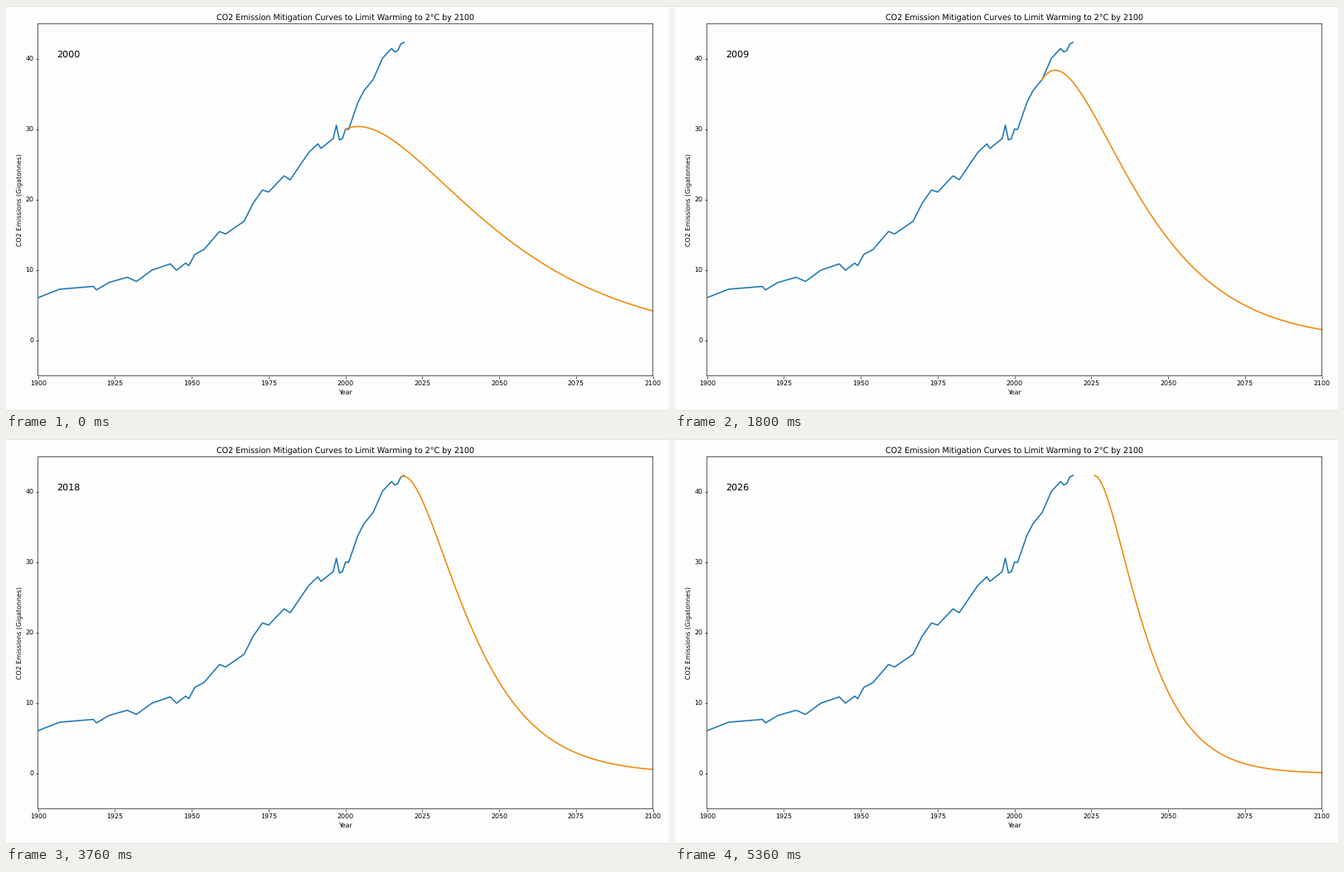
A matplotlib script that plays this animation: 800 by 489 pixels, repeating every 5400 ms.

```python
import numpy as np
import matplotlib.pyplot as plt
from matplotlib.animation import FuncAnimation
from matplotlib.patches import Rectangle

W, H, DPI = 800, 489, 64
INTERVAL, FRAMES, HOLD = 40, 135, 5  # each start year holds 5 frames
PT = 0.892  # size of one nominal point at this scale
FIRST, START, LAST, END = 1900, 2000, 2026, 2100
BUDGET = 1832  # gigatonnes that may be emitted from START on

plt.rcParams.update({
    "font.family": "DejaVu Sans",
    "font.size": 10 * PT,
    "text.hinting": "no_hinting",
    "axes.linewidth": 0.8 * PT,
    "axes.titlesize": 12 * PT,
    "axes.titlepad": 6 * PT,
    "lines.linewidth": 2 * PT,
})
for axis in ("xtick", "ytick"):
    plt.rcParams.update({
        f"{axis}.major.size": 3.5 * PT,
        f"{axis}.major.pad": 3.5 * PT,
        f"{axis}.major.width": 0.8 * PT,
    })

# Turning points of the historic emissions, straight in between
TURNS = [
    (1900, 6.1), (1907, 7.3), (1918, 7.7), (1919, 7.2), (1923, 8.25),
    (1929, 9.0), (1932, 8.4), (1937, 10.0), (1943, 10.9), (1945, 10.0),
    (1948, 11.0), (1949, 10.65), (1951, 12.25), (1954, 12.95),
    (1959, 15.5), (1961, 15.15), (1967, 16.95), (1970, 19.55),
    (1973, 21.4), (1975, 21.1), (1980, 23.4), (1982, 22.85),
    (1988, 26.7), (1991, 27.95), (1992, 27.3), (1996, 28.7),
    (1997, 30.6), (1998, 28.5), (1999, 28.7), (2000, 30.05),
    (2001, 30.0), (2004, 33.8), (2006, 35.5), (2009, 37.1),
    (2012, 40.1), (2015, 41.5), (2016, 41.0), (2017, 41.2),
    (2018, 42.15), (2019, 42.35),
]
turn_years, turn_values = np.array(TURNS).T
# np.interp keeps emissions level after the last known year
level = np.interp(np.arange(FIRST, LAST + 1), turn_years, turn_values)


def mitigation(year):
    """Emission path that spends exactly the remaining budget."""
    i = year - FIRST
    now = level[i]
    growth = np.polyfit(np.arange(6), np.log(level[i - 5:i + 1]), 1)[0]
    left = (BUDGET - level[START - FIRST:i + 1].sum()) / now
    decay = (1 + np.sqrt(1 + growth * left)) / left
    x = np.arange(year, END + 1)
    t = x - year
    return x, now * (1 + (growth + decay) * t) * np.exp(-decay * t)


fig = plt.figure(figsize=(W / DPI, H / DPI), dpi=DPI, facecolor="#fdfdfd")
for y in (0, H - 1):
    fig.add_artist(Rectangle((0, y / H), 1, 1 / H, color="#e2e2e2", lw=0,
                             transform=fig.transFigure))

ax = fig.add_axes([38.7 / W, (H - 446.5) / H, 742 / W, 425 / H],
                  facecolor="#fdfdfd")
ax.set(xlim=(FIRST, END), ylim=(-5, 45),
       xticks=range(FIRST, END + 1, 25), yticks=range(0, 50, 10),
       title="CO2 Emission Mitigation Curves to Limit Warming to 2°C by 2100")
ax.tick_params(axis="x", pad=4.5 * PT)
ax.set_xlabel("Year", labelpad=3 * PT)
ax.set_ylabel("CO2 Emissions (Gigatonnes)", labelpad=4 * PT)
for line in (*ax.spines.values(), *ax.get_xticklines(), *ax.get_yticklines()):
    line.set_snap(False)

ax.plot(turn_years, turn_values, color="#1f77b4")
path, = ax.plot([], [], color="#f0890c")
label = ax.text(1906, 40.25, "", fontsize=14 * PT)


def draw(frame):
    year = START + frame // HOLD
    path.set_data(*mitigation(year))
    label.set_text(str(year))
    return path, label


anim = FuncAnimation(fig, draw, frames=FRAMES, interval=INTERVAL,
                     repeat=True, repeat_delay=0, blit=False)
plt.show()
```
